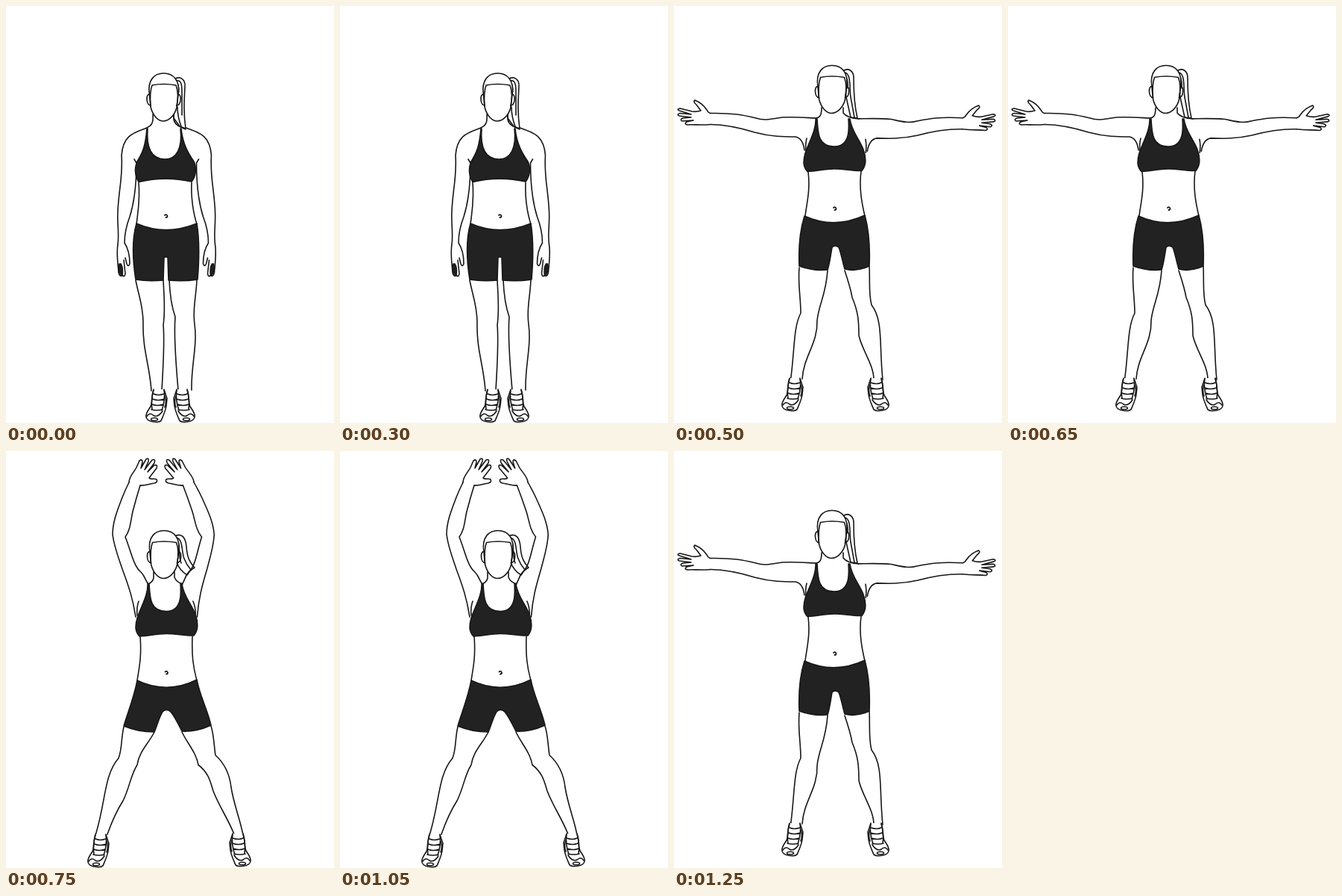
Write an HTML page that moves like this. It is 440 by 558 pixels and loops after 1500 ms.

```html
<!DOCTYPE html>
<html lang="en">
<head>
<meta charset="utf-8">
<title>Jumping jack</title>
<style>
  html, body { margin: 0; width: 100%; height: 100%; overflow: hidden; background: #fff; }
  svg { display: block; width: 100%; height: 100%; }
  .pose, defs { fill: none; stroke: #171717; stroke-width: 1.6; stroke-linecap: round; stroke-linejoin: round; }
  .cloth { fill: #222; }
  .skin { fill: #fff; }
</style>
</head>
<body>
<svg viewBox="0 0 440 558">
  <defs>
    <g id="head">
      <path class="skin" d="M192.500 119C189 98 200 90 211.500 90C224 90 234 99 231 119L229 136C226 147 218 154 211 154C204 154 197 147 194 135Z"/>
      <path d="M194 134C193 122 193 114 196 106Q211 103 228 106C231 114 231 124 229 134"/>
      <path d="M193 118C187 117 188 133 194 133M231 118C236 118 235 133 229 133"/>
    </g>
    <g id="shoe">
      <path class="skin" d="M10-1C7 7 9 15 6 22C3 27-1 31 0 36C1 43 16 44 20 41C23 34 26 28 27 21L28 11C26 6 25 2 24-1"/>
      <path d="M10 5Q16 8 24 5M9 12Q16 15 24 12M8 19Q15 22 23 19M7 26Q14 28 22 26M10 0Q6 13 8 26M24 0Q26 13 21 27"/>
      <path d="M1 35Q5 29 10 34Q16 37 22 28M25 8Q28 15 25 23"/>
      <ellipse cx="11" cy="39" rx="4.500" ry="1.800"/>
    </g>
    <path id="bra" class="cloth" d="M190 151C191 165 182 180 176 197C173 208 173 215 179 221.500C192 221 202 218 215 218C229 218 239 221 252 220.500C258 213 258 203 254 192C249 178 238 168 236 151H234C235 165 236 188 215 188C194 188 193 172 192 151Z"/>
    <path id="navel" d="M-1.500-1Q1-3 2 0Q2 2 0 2" stroke-width="1.800"/>

    <g id="armDown">
      <path d="M189 163C174 169 157 171 155 200C157 228 151 247 150 275C149 292 152 304 150 319C148 330 150 344 151 356"/>
      <path d="M172 205L175 210C175 240 172 263 166 282C161 295 159 306 159 317C163 323 166 334 166 345Q164 350 162 345L160 337"/>
      <path d="M151 356Q152 362 155 361M158 340L160 358Q159 364 156 360"/>
      <path class="cloth" d="M152 345C150 352 153 360 156 361C157 354 156 348 154 345Z"/>
    </g>
    <g id="armOut">
      <path d="M189 150C171 149 159 148 145 149C132 151 122 154 110 150C93 146 79 143 49 143.500"/>
      <path d="M49 158.500C73 159 92 164 108 169C130 175 148 175 163 175Q173 177 175 193M178 177Q176 185 177 195"/>
      <path d="M49 143.500Q46 143 44 139C40 133 33 128 28 126Q25 128 30 132L36 140M36 140Q30 142 24 141L8 137Q3 138 7 140L23 145L8 143.500Q3 145 7 147L23 149L12 150Q7 152 11 154L26 153L17 155Q13 158 18 159C26 158 34 160 49 158.500"/>
    </g>
    <g id="armUp">
      <path d="M174 222C170 197 165 182 156 158C151 143 145 128 143 112C143 94 150 78 156 62C160 52 162 48 165 42"/>
      <path d="M191 178C187 174 187 168 181 162C171 154 168 135 160 115C167 106 167 94 170 81Q175 62 180 46M178 201Q175 209 176 220"/>
      <path d="M165 42C165 34 172 28 175 22L179 13Q183 10 183 15L181 23L188 11Q192 8 191 14L186 25L196 12Q201 10 199 16L190 28L199 19Q204 18 202 23L192 36C194 39 198 36 202 38Q204 42 199 43C191 44 186 47 180 46"/>
    </g>
  </defs>

  <g class="pose">
    <path class="skin" d="M226 98C233 93 241 98 240 108C239 127 238 143 241 164L233 161L225 150Z"/>
    <path d="M228 100C237 98 236 110 236 121L236 146M230 104Q233 109 231 119M230 135Q230 148 235 161"/>
    <use href="#head"/>
    <path d="M197 145C198 157 195 160 189 163M225 145V152C227 160 234 162 241 165"/>
    <use href="#armDown"/>
    <use href="#armDown" transform="matrix(-1 0 0 1 430.500 0)"/>
    <path d="M178 236C180 262 177 275 175 292M249 236C248 260 251 276 256 292"/>
    <path class="cloth" d="M189 164C187 190 182 198 176 208C172 217 173 228 178 235.500Q213 227 249 235C255 228 256 216 252 208C245 198 237 185 235 164H234C237 190 229 205 213 205C195 205 188 190 190 164Z"/>
    <path class="cloth" d="M175 291Q214 308 256 291C260 315 259 342 257 366Q238 369 218 367L217 336H212L211 367Q191 369 174 366C170 341 169 312 175 291Z"/>
    <path d="M174 367C178 388 184 401 184 424C183 460 193 482 195 515M211 367C212 390 214 405 211 427C213 450 211 480 209 514"/>
    <path d="M256 367C255 390 250 405 253 426C257 455 248 482 249 514M219 367C220 390 222 402 227 416C225 440 228 480 231 514"/>
    <use href="#navel" x="214.500" y="281"/>
    <use href="#shoe" x="188" y="514"/>
    <use href="#shoe" transform="matrix(-1 0 0 1 253 514)"/>
  </g>

  <g class="pose">
    <path class="skin" d="M227 87C234 82 241 87 241 96C241 116 242 133 246 150L237 149L231 122Z"/>
    <path d="M229 89C238 91 235 108 237 122L242 149M231 95Q234 102 233 110"/>
    <use href="#head" x=".5" y="-10.500"/>
    <path d="M198 136C198 146 196 150 189 150M227 136V143Q232 150 248 151"/>
    <use href="#armOut"/>
    <use href="#armOut" transform="rotate(2.200 250 150) translate(436 1) scale(-1 1)"/>
    <path d="M180 222C183 247 178 264 176 281M251 221C248 244 252 264 256 281"/>
    <use href="#bra"/>
    <path class="cloth" d="M175 281Q215 299 256 280C262 302 263 325 262 348Q245 356 229 352C226 342 224 330 221 323Q216 319 212 323C210 334 209 344 206 353Q187 355 168 348C167 325 168 303 175 281Z"/>
    <path d="M168 350C166 373 170 389 170 411C160 430 162 460 156.500 500M206 354C204 386 194 400 192 421C193 452 174 468 172 499"/>
    <path d="M262 348C263 370 261 385 265 400C281 421 275 452 280 500M229 354C234 369 237 378 239 390C247 409 248 421 248 441C252 460 268 480 268 500"/>
    <use href="#navel" x="215.500" y="271"/>
    <use href="#shoe" x="145" y="499"/>
    <use href="#shoe" transform="matrix(-1 0 0 1 288 499)"/>
  </g>

  <g class="pose">
    <path class="skin" d="M226 114C236 109 241 116 242 128C243 143 247 150 253 156Q247 159 243 166Q233 160 229 149Z"/>
    <path d="M229 116C238 119 235 134 239 144Q242 152 248 159M231 122C234 130 231 140 235 150"/>
    <use href="#head" x=".5" y="16.500"/>
    <path d="M198 162V170Q197 175 191 178M226 162V169Q229 176 237 178"/>
    <use href="#armUp"/>
    <use href="#armUp" transform="matrix(-1 0 .074 1 414 0)"/>
    <path d="M180 248C182 275 179 288 176 307M250 248C249 274 251 289 256 307"/>
    <use href="#bra" y="26.500"/>
    <path class="cloth" d="M176 307Q216 326 256 306C260 328 270 345 275 367Q256 376 236 375C231 365 226 355 221 349Q215 344 210 349C205 357 203 367 199 376Q177 376 158 368C164 348 172 329 176 307Z"/>
    <path d="M158 369C154 387 156 398 151 411C131 434 134 470 120 514M199 376C191 392 179 401 176 420C167 434 166 450 157 468Q145 487 136 513"/>
    <path d="M275 368C279 380 279 395 281 407C292 417 300 432 302 450C306 475 314 492 318 514M236 376C243 391 255 403 258 420C272 431 274 442 278 455C286 476 298 492 306 513"/>
    <use href="#navel" x="215" y="296.500"/>
    <use href="#shoe" x="110" y="514"/>
    <use href="#shoe" transform="matrix(-1 0 0 1 328 513)"/>
  </g>
</svg>
<script>
  const [standing, halfway, raised] = document.querySelectorAll('.pose');
  const start = performance.now();

  function poseAt(time) {
    if (time < 500) return standing;
    return time >= 750 && time < 1250 ? raised : halfway;
  }

  function draw() {
    const current = poseAt((performance.now() - start) % 1500);
    for (const pose of [standing, halfway, raised]) {
      pose.style.display = pose === current ? '' : 'none';
    }
    requestAnimationFrame(draw);
  }
  draw();
</script>
</body>
</html>
```
